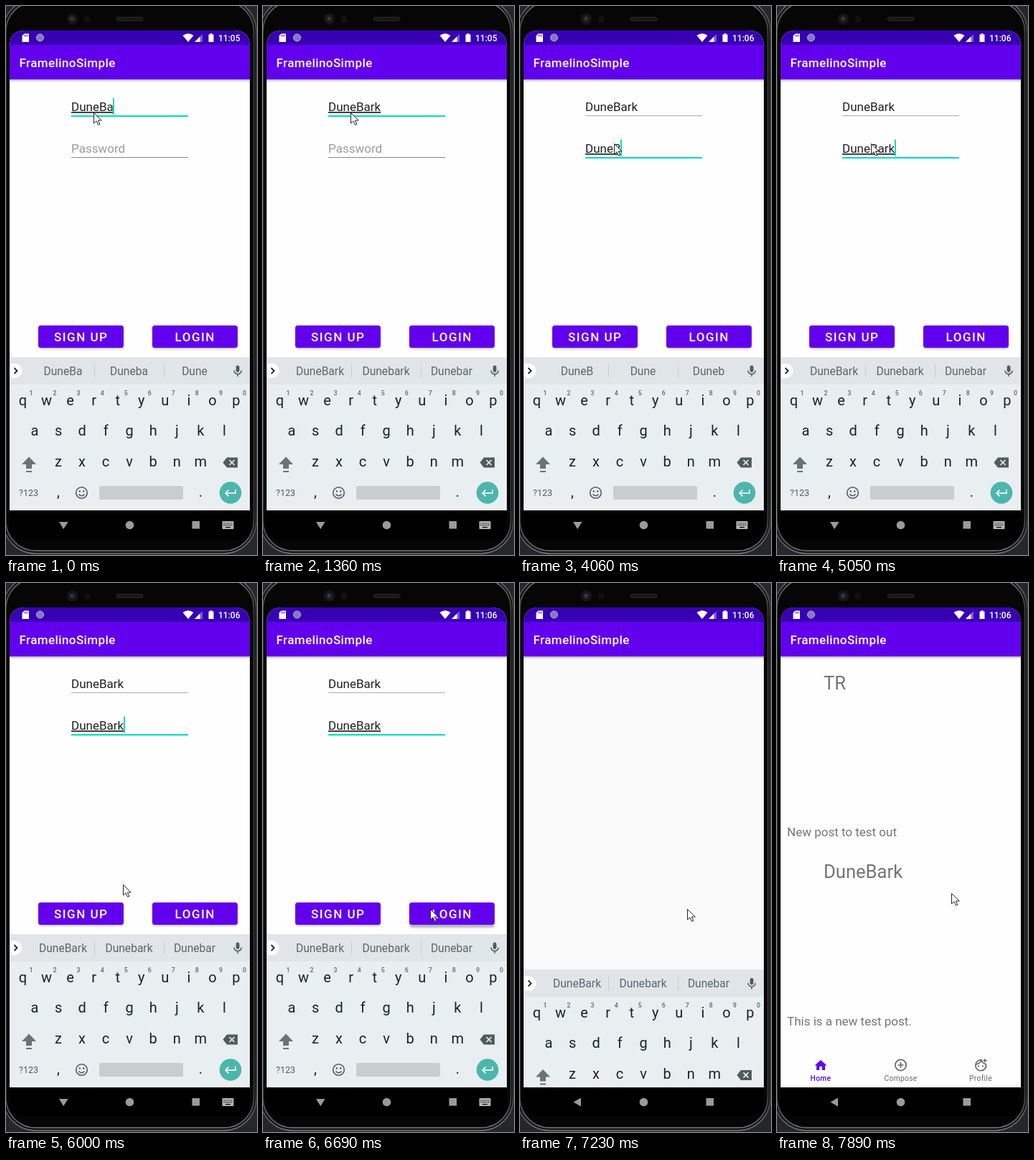
An HTML page that plays this animation: 350 by 763 pixels, repeating every 8000 ms.

```html
<!DOCTYPE html>
<html lang="en">
<head>
<meta charset="utf-8">
<title>Login demo</title>
<style>
  html, body { margin: 0; width: 100%; height: 100%; overflow: hidden; background: #26272a; }
  svg { display: block; width: 350px; height: 763px; font-family: Roboto, sans-serif; }
  .title { font-size: 17px; font-weight: 500; letter-spacing: .4px; fill: #fff; }
  .field { font-size: 17px; fill: #212121; }
  .field.hint { fill: #9c9c9c; }
  .field.composing { text-decoration: underline; text-decoration-thickness: 1px; }
  .btn { font-size: 17px; font-weight: 500; letter-spacing: 1.5px; fill: #fff; }
  .word { font-size: 15.6px; fill: #5b666c; text-anchor: middle; }
  .key { font-size: 20px; fill: #17242b; text-anchor: middle; }
  .num { font-size: 8.8px; font-weight: 500; fill: #5b666c; text-anchor: middle; }
  .name { font-size: 25.6px; fill: #757575; }
  .post { font-size: 17px; fill: #757575; }
  .tab { font-size: 10.2px; letter-spacing: .35px; fill: #666; text-anchor: middle; }
</style>
</head>
<body>
<svg viewBox="0 0 350 763" xmlns="http://www.w3.org/2000/svg">
  <defs>
    <clipPath id="screen"><path d="M5 701V56Q5 34 27 34H318Q340 34 340 56V701Z"/></clipPath>
    <linearGradient id="fade" x2="0" y2="1">
      <stop stop-color="#000" stop-opacity=".28"/><stop offset="1" stop-color="#000" stop-opacity="0"/>
    </linearGradient>
    <linearGradient id="metal" x2="0" y2="1">
      <stop stop-color="#77777a"/><stop offset=".07" stop-color="#3a3a3c"/>
      <stop offset=".93" stop-color="#3a3a3c"/><stop offset="1" stop-color="#77777a"/>
    </linearGradient>
    <filter id="blur" x="-10%" y="-30%" width="120%" height="170%"><feGaussianBlur stdDeviation="1.6"/></filter>
  </defs>

  <rect x="-4" y="-10" width="353" height="771" rx="45" fill="#161617" stroke="url(#metal)" stroke-width="1.5"/>
  <rect x="0" y="-6" width="345.5" height="763" rx="41" fill="#060607" stroke="url(#metal)" stroke-width="1.5"/>
  <circle cx="92.5" cy="18" r="8" fill="#141415"/>
  <circle cx="92.5" cy="18" r="4.5" fill="#222326"/>
  <circle cx="92" cy="17.5" r="1.7" fill="#44474b"/>
  <rect x="109" y="14" width="8" height="9" rx="2" fill="#111112"/>
  <rect x="154" y="15.5" width="37" height="5" rx="2.5" fill="#18181a" stroke="#29292b"/>

  <g clip-path="url(#screen)">
    <rect x="5" y="34" width="335" height="667" fill="#fefefe"/>
    <g id="login">
      <rect x="5" y="54" width="335" height="48" fill="#6200ee"/>
      <rect x="5" y="102" width="335" height="4" fill="url(#fade)"/>
      <text class="title" x="18.5" y="85">FramelinoSimple</text>
      <rect id="line0" x="91" width="163"/>
      <rect id="line1" x="91" width="163"/>
      <text id="field0" x="91" y="146"></text>
      <text id="field1" x="91" y="204"></text>
      <rect id="caret" width="2" height="23" fill="#03dac5"/>
      <rect x="45.5" y="445.5" width="118" height="31" rx="3.5" opacity=".25" filter="url(#blur)"/>
      <rect x="45" y="444" width="119" height="31" rx="3.5" fill="#6200ee"/>
      <rect id="shade" x="204.5" width="118" height="31" rx="3.5" filter="url(#blur)"/>
      <rect x="204" y="444" width="119" height="31" rx="3.5" fill="#6200ee"/>
      <rect id="ripple" x="204" y="444" width="119" height="31" rx="3.5" fill="#fff" opacity=".16"/>
      <text class="btn" x="67" y="466">SIGN UP</text>
      <text class="btn" x="235.5" y="466">LOGIN</text>
    </g>

    <g id="home">
      <rect id="page" x="5" y="34" width="335" height="667"/>
      <rect x="5" y="34" width="335" height="20" fill="#3700b3"/>
      <rect x="5" y="54" width="335" height="48" fill="#6200ee"/>
      <rect x="5" y="102" width="335" height="4" fill="url(#fade)"/>
      <text class="title" x="18.5" y="85">FramelinoSimple</text>
      <g id="posts">
        <text class="name" x="65" y="147.5">TR</text>
        <text class="post" x="14" y="352">New post to test out</text>
        <text class="name" x="65" y="410">DuneBark</text>
        <text class="post" x="14" y="615">This is a new test post.</text>
      </g>
      <path d="M61 663L52.5 670.5H55V677H59.2V672H62.8V677H67V670.5H69.5Z" fill="#6200ee"/>
      <g fill="none" stroke="#666" stroke-width="1.7">
        <circle cx="172.5" cy="670" r="7.6"/>
        <path d="M172.5 666V674M168.5 670H176.5"/>
        <path d="M286 663.2A7.4 7.4 0 1 0 291.2 668.2"/>
        <path d="M277.5 669Q283 668 285 663.5Q287 668 291 668.5"/>
      </g>
      <path d="M281 670.3a1.1 1.1 0 1 0 .1 0M287 670.3a1.1 1.1 0 1 0 .1 0M290 660.5l1 2.3 2.3 1-2.3 1-1 2.3-1-2.3-2.3-1 2.3-1z" fill="#666"/>
      <text class="tab" x="61" y="692" style="fill:#6200ee;font-weight:500">Home</text>
      <text class="tab" x="172.5" y="692">Compose</text>
      <text class="tab" x="284" y="692">Profile</text>
    </g>

    <g id="keyboard">
      <rect x="5" y="488" width="335" height="213" fill="#e9eef1"/>
      <rect x="5" y="488" width="335" height="38" fill="#e0e5e8"/>
      <path d="M5 497H12.5A10 10 0 0 1 12.5 517H5Z" fill="#fff"/>
      <path d="M11.5 503L15.5 507L11.5 511" fill="none" stroke="#222" stroke-width="1.8"/>
      <path d="M123.5 497V517M220.5 497V517" stroke="#c9cfd3"/>
      <text class="word" x="79.5" y="513"></text>
      <text class="word" x="171.5" y="513"></text>
      <text class="word" x="263" y="513"></text>
      <rect x="320.7" y="499.5" width="4.8" height="9.5" rx="2.4" fill="#505b61"/>
      <path d="M318 506.5A5.1 5.1 0 0 0 328.2 506.5M323.1 511.5V515" fill="none" stroke="#505b61" stroke-width="1.5"/>
      <g id="keys"></g>
      <path d="M32 626.5L22 637H28V643H36V637H42Z" fill="#69747a"/>
      <rect x="28" y="646" width="8" height="2" fill="#69747a"/>
      <path d="M302.5 634.5L308 627.5H323V641.5H308Z" fill="#505b61"/>
      <path d="M311.5 631L318.5 638M318.5 631L311.5 638" stroke="#e9eef1" stroke-width="1.7"/>
      <text x="18" y="681" font-size="12.5" fill="#505b61">?123</text>
      <g fill="none" stroke="#505b61" stroke-width="1.6">
        <circle cx="105.5" cy="676.5" r="7.8"/>
        <path d="M101.5 678.5Q105.5 683 109.5 678.5"/>
      </g>
      <circle cx="102.8" cy="674.5" r="1.2" fill="#505b61"/>
      <circle cx="108.2" cy="674.5" r="1.2" fill="#505b61"/>
      <rect x="130" y="667" width="117" height="19" rx="2" fill="#c8cdd0"/>
      <circle cx="313" cy="676.5" r="15.3" fill="#4db6ac"/>
      <path d="M320 672V677H306.5M310.5 672.5L306.2 677L310.5 681.5" fill="none" stroke="#fff" stroke-width="1.7"/>
    </g>

    <rect x="5" y="34" width="335" height="20" fill="#3700b3"/>
    <path d="M25.5 38.5H32V50H22.5V41.5Z" fill="#fff"/>
    <path d="M26 40V42.5M28 40V42.5M30 40V42.5" stroke="#3700b3" stroke-width=".9"/>
    <circle cx="47.5" cy="44" r="5" fill="#8278bd" stroke="#b6b0d8"/>
    <path d="M246.5 41Q254 35.500 261.500 41L254 50Z" fill="#fff"/>
    <path d="M274 39V50H263Z" fill="#fff" opacity=".35"/>
    <path d="M270.5 42.5V50H263Z" fill="#fff"/>
    <path d="M282.5 39.5H284.5V38.2H287.5V39.5H289.5V50H282.5Z" fill="#fff"/>
    <text id="clock" x="296" y="48.5" font-size="12" font-weight="500" fill="#fff"></text>
  </g>

  <path d="M5 701H340V720Q340 742 318 742H27Q5 742 5 720Z" fill="#000"/>
  <g fill="#9b9b9b">
    <path id="back"/>
    <circle cx="172.5" cy="721.5" r="5.8"/>
    <rect x="259.5" y="716" width="10.5" height="10.5"/>
    <g id="ime">
      <rect x="301.5" y="716" width="16" height="11" rx="1" fill="#b4b4b4"/>
      <path d="M303.5 719H316M303.5 721.5H316" stroke="#000" stroke-width="1.2" stroke-dasharray="1.4 1.2"/>
      <path d="M306 724.5H313" stroke="#000" stroke-width="1.2"/>
    </g>
  </g>
  <path id="pointer" d="M.5 .5V15L4 11.8L6.600 17.300L8.900 16.200L6.400 11H11.300Z" fill="#fff" stroke="#222"/>
</svg>

<script>
const LOOP = 8000;
const $ = id => document.getElementById(id);
const words = [...document.querySelectorAll('.word')];
const clamp = v => Math.max(0, Math.min(1, v));

const TICKS = [0, 400, 800, 1360, 1760, 1880, 2030, 2280, 2810, 2930, 3080, 3360, 3510, 3630, 4060,
  4620, 4770, 5050, 5480, 5880, 6000, 6150, 6270, 6390, 6540, 6690, 6810, 6960, 7080, 7230, 7350,
  7470, 7620, 7740, 7890];

// time, text in the focused field, suggestions
const TYPING = [
  [0, 'DuneBa', 'DuneBa Duneba Dune'],
  [400, 'DuneBar', 'DuneBar Dunebar Duneba'],
  [800, 'DuneBark', 'DuneBark Dunebark Dunebar'],
  [2280, '', 'thanks I can'],
  [3080, 'D', "D Do Don't"],
  [3360, 'Du', 'Du Due Dude'],
  [3510, 'Dun', 'Dun Dune Dunk'],
  [3630, 'Dune', 'Dune Dunes Dunk'],
  [4060, 'DuneB', 'DuneB Dune Duneb'],
  [4620, 'DuneBa', 'DuneBa Duneba Dune'],
  [4770, 'DuneBar', 'DuneBar Dunebar Duneba'],
  [5050, 'DuneBark', 'DuneBark Dunebark Dunebar']
];

const POINTER = [[0, 122, 148], [1760, 126, 158], [1880, 131, 174], [2030, 131, 191],
  [5880, 140, 265], [6000, 163, 419], [6150, 186, 428], [6270, 214, 438], [6390, 230, 444],
  [6540, 233, 453], [7620, 243, 449], [7740, 253, 440], [7890, 243, 431]];

const CARET = [[0, 1], [1360, 0], [1880, 1], [2810, 0], [3080, 1], [5480, 0], [6000, 1], [6540, 0], [6960, 1]];

const at = (list, t) => list.filter(row => row[0] <= t).pop();

function set(id, attrs) {
  for (const name in attrs) $(id).setAttribute(name, attrs[name]);
}

function show(id, on) {
  $(id).style.display = on ? '' : 'none';
}

function buildKeys() {
  const rows = [['qwertyuiop', 23.5, 555], ['asdfghjkl', 40, 597], ['zxcvbnm', 73, 640]];
  let html = '';
  rows.forEach(([letters, x0, y], row) => [...letters].forEach((c, i) => {
    const x = x0 + 33.05 * i;
    html += `<text class="key" x="${x}" y="${y}">${c}</text>`;
    if (row === 0) html += `<text class="num" x="${x + 11.5}" y="540.5">${(i + 1) % 10}</text>`;
  }));
  html += '<text class="key" x="73" y="682">,</text><text class="key" x="271.5" y="682">.</text>';
  $('keys').innerHTML = html;
}

function drawField(i, text, focused, composing) {
  const el = $('field' + i);
  el.textContent = text || (i ? 'Password' : '');
  el.setAttribute('class', 'field' + (text ? '' : ' hint') + (composing ? ' composing' : ''));
  const y = 152 + 58 * i;
  set('line' + i, focused
    ? { y, height: 2, fill: '#03dac5' }
    : { y, height: 1, fill: i ? '#858585' : '#adadad' });
  if (focused) {
    const width = text ? el.getComputedTextLength() : 0;
    set('caret', { x: Math.ceil(90 + width), y: 128 + 57.5 * i });
  }
}

function draw(time) {
  const t = TICKS.filter(k => k <= time).pop();
  const [, text, hints] = at(TYPING, t);
  const second = t >= 2280;

  drawField(0, second ? 'DuneBark' : text, !second, !second);
  drawField(1, second ? text : '', second, second && text && t < 6960);
  show('caret', at(CARET, t)[1]);
  hints.split(' ').forEach((w, i) => { words[i].textContent = w; });
  $('clock').textContent = t < 2930 ? '11:05' : '11:06';

  const pressed = t >= 6690 && t < 6960;
  set('shade', { y: pressed ? 448 : 445.5, opacity: pressed ? .28 : .25 });
  show('ripple', t >= 6810);

  // The new page rises and fades in, then the keyboard slides away.
  const enter = clamp((t - 6990) / 260);
  show('home', enter > 0);
  set('home', {
    transform: `translate(0 ${Math.round(61 * (1 - enter) ** 2)})`,
    opacity: Math.min(1, enter * 1.97)
  });
  set('page', { fill: t < 7470 ? '#fafafa' : '#fefefe' });
  show('posts', t >= 7470);

  const p = clamp((t - 7130) / 320);
  set('keyboard', { transform: `translate(0 ${213 * p * p * (3 - 2 * p)})` });
  show('keyboard', p < 1);
  show('ime', t < 7080);
  set('back', { d: t < 7080 ? 'M74 717H86.5L80.2 727Z' : 'M85 715.5V727.5L74.5 721.5Z' });

  const [, x, y] = at(POINTER, t);
  set('pointer', { transform: `translate(${x} ${y})` });
}

function frame() {
  draw(performance.now() % LOOP);
  requestAnimationFrame(frame);
}

buildKeys();
frame();
</script>
</body>
</html>
```
